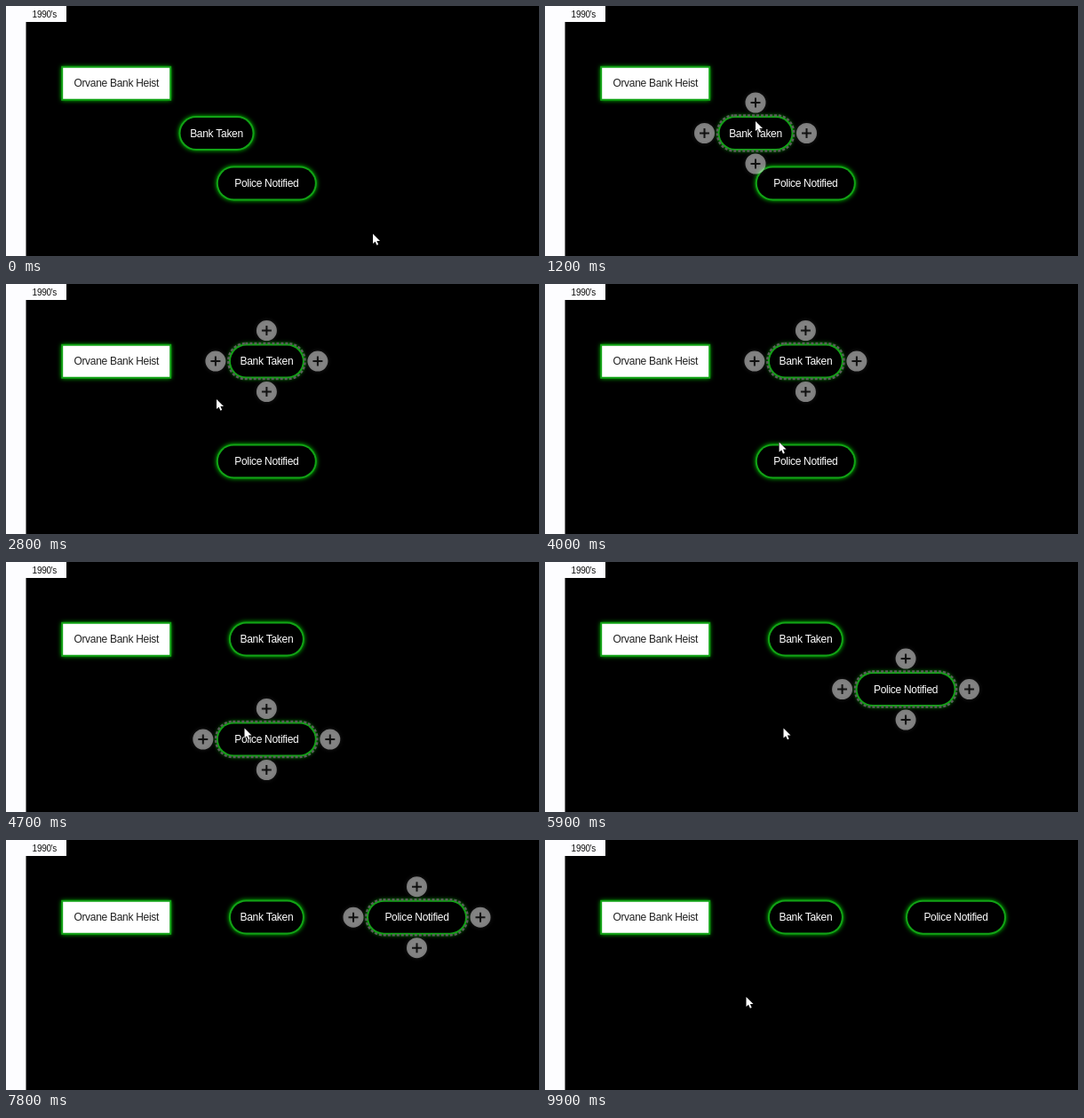
An HTML page with a canvas that plays this animation: 600 by 282 pixels, repeating every 10000 ms.

```html
<!DOCTYPE html>
<html lang="en">
<head>
<meta charset="utf-8">
<title>Timeline board</title>
<style>
  html, body { margin: 0; width: 100%; height: 100%; overflow: hidden; background: #000; }
  canvas { display: block; }
</style>
</head>
<body>
<canvas id="stage" width="600" height="282"></canvas>
<script>
const ctx = document.getElementById("stage").getContext("2d");
const LOOP = 10000;
const STEP = 56.4; // one arrow-key press
const FONT = '"Liberation Sans", Arial, sans-serif';

const point = (x, y) => ({ x, y });
const presses = (t, ...times) => times.filter(at => t >= at).length;

function ease(t, from, to) {
  const p = Math.min(1, Math.max(0, (t - from) / (to - from)));
  return p * p * (3 - 2 * p);
}

const mix = (a, b, k) => point(a.x + (b.x - a.x) * k, a.y + (b.y - a.y) * k);

function cursorAt(t) {
  const onBank = mix(point(413, 257), point(237, 130), ease(t, 200, 1200));
  const onPolice = mix(onBank, point(268.5, 187.5), ease(t, 3400, 4200));
  return mix(onPolice, point(226.5, 177), ease(t, 9000, 9900));
}

function label(text, { x, y }, size, color) {
  ctx.font = `${size}px ${FONT}`;
  ctx.letterSpacing = "-0.3px";
  ctx.textAlign = "center";
  ctx.fillStyle = color;
  ctx.fillText(text, x, y + size * 0.34);
}

function box({ x, y }, w, h, radius) {
  ctx.beginPath();
  ctx.roundRect(x - w / 2, y - h / 2, w, h, radius);
}

function node(text, at, w, radius, fill, color) {
  box(at, w, 39, radius);
  ctx.save();
  ctx.shadowColor = "#0c0";
  ctx.shadowBlur = 5;
  ctx.fillStyle = "#12a316";
  ctx.fill();
  ctx.restore();
  box(at, w - 4, 35, Math.max(0, radius - 2));
  ctx.fillStyle = fill;
  ctx.fill();
  label(text, at, 12, color);
}

function plusButton({ x, y }, cursor) {
  const hovered = cursor && Math.hypot(cursor.x - x, cursor.y - y) < 12;
  const plus = new Path2D();
  plus.rect(x - 5.5, y - 1, 11, 2);
  plus.rect(x - 1, y - 5.5, 2, 4.5);
  plus.rect(x - 1, y + 1, 2, 4.5);
  const disc = new Path2D(plus);
  disc.arc(x, y, 11.5, 0, 2 * Math.PI);

  // The plus is cut out of the disc so both share one opacity.
  ctx.save();
  ctx.globalAlpha = hovered ? 0.8 : 0.46;
  ctx.fillStyle = "#000";
  ctx.fill(plus);
  ctx.shadowColor = "rgba(128, 128, 128, 0.5)";
  ctx.shadowBlur = 5;
  ctx.fillStyle = "#fff";
  ctx.fill(disc, "evenodd");
  ctx.restore();
}

function selection(at, w, cursor) {
  ctx.save();
  box(at, w + 1, 40, 19);
  ctx.setLineDash([3, 2]);
  ctx.strokeStyle = "#5c5c5c";
  ctx.lineWidth = 2.5;
  ctx.stroke();
  ctx.restore();
  for (const side of [-1, 1]) {
    plusButton(point(at.x, at.y + side * 34.5), cursor);
    plusButton(point(at.x + side * (w / 2 + 15), at.y), cursor);
  }
}

function arrow({ x, y }) {
  const shape = new Path2D("M0 0V11L2.6 8.7L4.4 12.8L6.2 12L4.4 8H8Z");
  ctx.save();
  ctx.translate(x, y);
  ctx.strokeStyle = "#000";
  ctx.stroke(shape);
  ctx.fillStyle = "#fff";
  ctx.fill(shape);
  ctx.restore();
}

function draw(t) {
  const bank = point(237 + STEP * presses(t, 2400), 143.5 - STEP * presses(t, 1800));
  const police = point(
    293.3 + STEP * presses(t, 5500, 5900, 6300),
    200 - STEP * presses(t, 5000, 6700)
  );
  const cursor = t < 6700 || t >= 8600 ? cursorAt(t) : null;

  ctx.fillStyle = "#000";
  ctx.fillRect(0, 0, 600, 282);
  ctx.fillStyle = "#fdfdff";
  ctx.fillRect(0, 0, 22.5, 282);
  ctx.fillRect(0, 0, 68, 18);
  label("1990's", point(43.3, 9.5), 10, "#111");

  node("Orvane Bank Heist", point(124.2, 87.3), 124, 0, "#fff", "#222");
  node("Bank Taken", bank, 85, 19.5, "#000", "#fff");
  node("Police Notified", police, 113, 19.5, "#000", "#fff");

  if (t >= 1200 && t < 4500) selection(bank, 85, cursor);
  if (t >= 4500 && t < 8800) selection(police, 113, cursor);
  if (cursor) arrow(cursor);
}

const start = performance.now();
function tick() {
  draw((performance.now() - start) % LOOP);
  requestAnimationFrame(tick);
}
tick();
</script>
</body>
</html>
```
